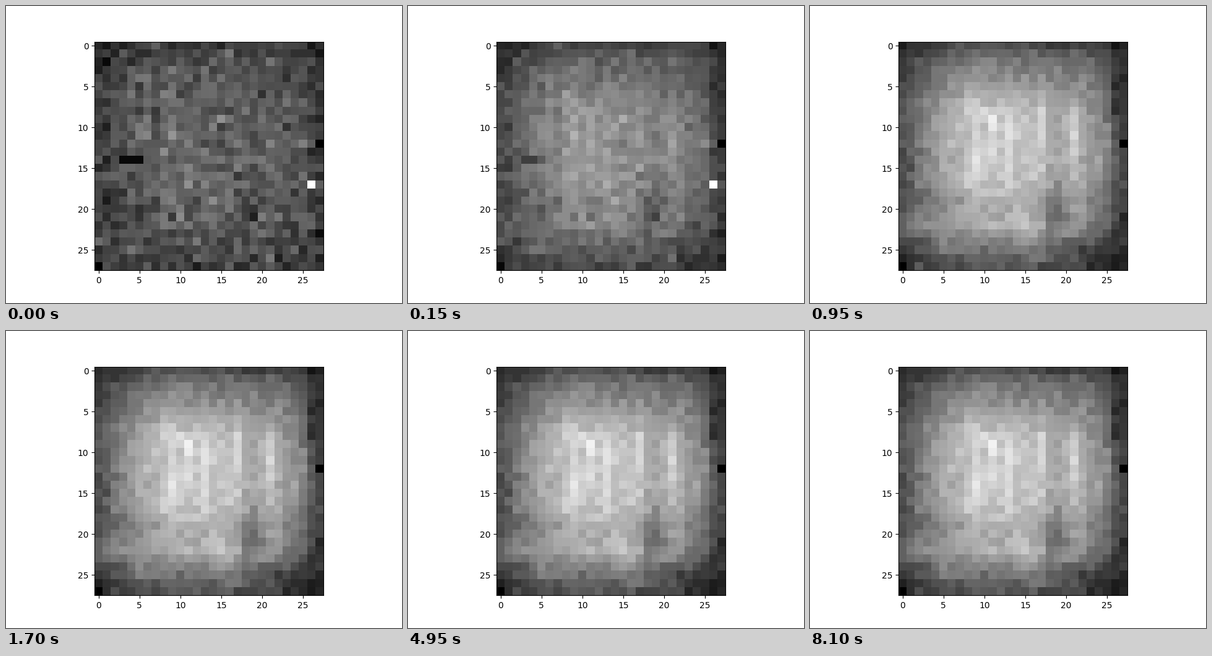
Recreate the animation shown at these times as a matplotlib script. Size 640x480 px, loop 10 s.

```python
import numpy as np
import matplotlib.pyplot as plt
from matplotlib.animation import FuncAnimation

SIZE = 28
STEP = 50      # ms per frame
LOOP = 10000   # ms per loop
TAU = 240      # settling time in ms
SETTLED = 950  # ms until only single cells still change
DROP = 600     # ms until the hot cell cools

HOT = (17, 26)
COLD = [(27, 0), (12, 27)]

# Soft spots: centre row, centre column, height, width, gain
SPOTS = [
    (14, 9, 4, 0.8, 25), (13, 13, 5, 0.5, 28), (12, 21, 5, 0.5, 30),
    (10, 17, 4, 0.5, 22), (9, 11, 1.2, 0.6, 40), (21, 14.5, 2, 1.8, 25),
    (24, 15.5, 1.5, 1, 30), (24.5, 5, 1.5, 0.5, 40), (22, 1, 2, 2.5, 30),
    (20, 18.5, 2, 1.2, -45), (25, 24, 2.5, 3, -35), (6, 26.5, 3, 0.8, -30),
]

# Late single changes: time, row, column
LATE = [
    (1100, 27, 2), (1300, 0, 0), (1500, 22, 12), (1700, 14, 4),
    (1950, 18, 10), (2250, 10, 27), (2700, 7, 2), (3150, 26, 19),
    (3600, 27, 15), (4150, 14, 22), (4950, 7, 17), (6150, 13, 12),
    (7100, 8, 8), (8100, 15, 1),
]

rng = np.random.default_rng(7)
index = np.arange(SIZE)
row, col = np.mgrid[:SIZE, :SIZE]


def noise(sd):
    return rng.normal(0, sd, (SIZE, SIZE))


def settled_field():
    across = np.interp(index, [0, 2, 5, 9, 17, 18, 22, 25, 26, 27],
                       [0.35, 0.55, 0.8, 1, 0.95, 0.82, 0.82, 0.6, 0.38, 0.3])
    down = np.interp(index, [0, 2, 4, 8, 16, 19, 22, 24, 27],
                     [0.35, 0.58, 0.72, 0.98, 1, 0.85, 0.82, 0.62, 0.36])
    field = 20 + 185 * np.outer(down, across)
    for r, c, height, width, gain in SPOTS:
        field += gain * np.exp(-((row - r) / height) ** 2 - ((col - c) / width) ** 2)
    return field + noise(10)


final = settled_field()
first = 42 + 0.3 * final + noise(17)
for cell in COLD:
    first[cell] = final[cell] = 0
first[2, 1] = first[14, 3:6] = 8


def field_at(t):
    k = 1 - np.exp(-t / TAU) if t <= SETTLED else 1
    field = first + (final - first) * k
    if 0 < t <= SETTLED:
        field += noise(8 * (1 - k))
    if t < DROP:
        field[HOT] = 255
    for n, (when, r, c) in enumerate(LATE):
        if t < when:
            field[r, c] += 14 * k * (-1) ** n
    return np.clip(field, 0, 255)


times = [*range(0, DROP + 1, STEP), 700, 800, SETTLED] + [when for when, _, _ in LATE]
fields = [field_at(t) for t in times]

fig, ax = plt.subplots(figsize=(6.4, 4.8), dpi=100)
image = ax.imshow(fields[0], cmap="gray", vmin=0, vmax=255)


def update(i):
    state = np.searchsorted(times, i * STEP, side="right") - 1
    image.set_data(fields[state])
    return [image]


anim = FuncAnimation(fig, update, frames=LOOP // STEP, interval=STEP,
                     repeat=True, repeat_delay=0)
plt.show()
```
